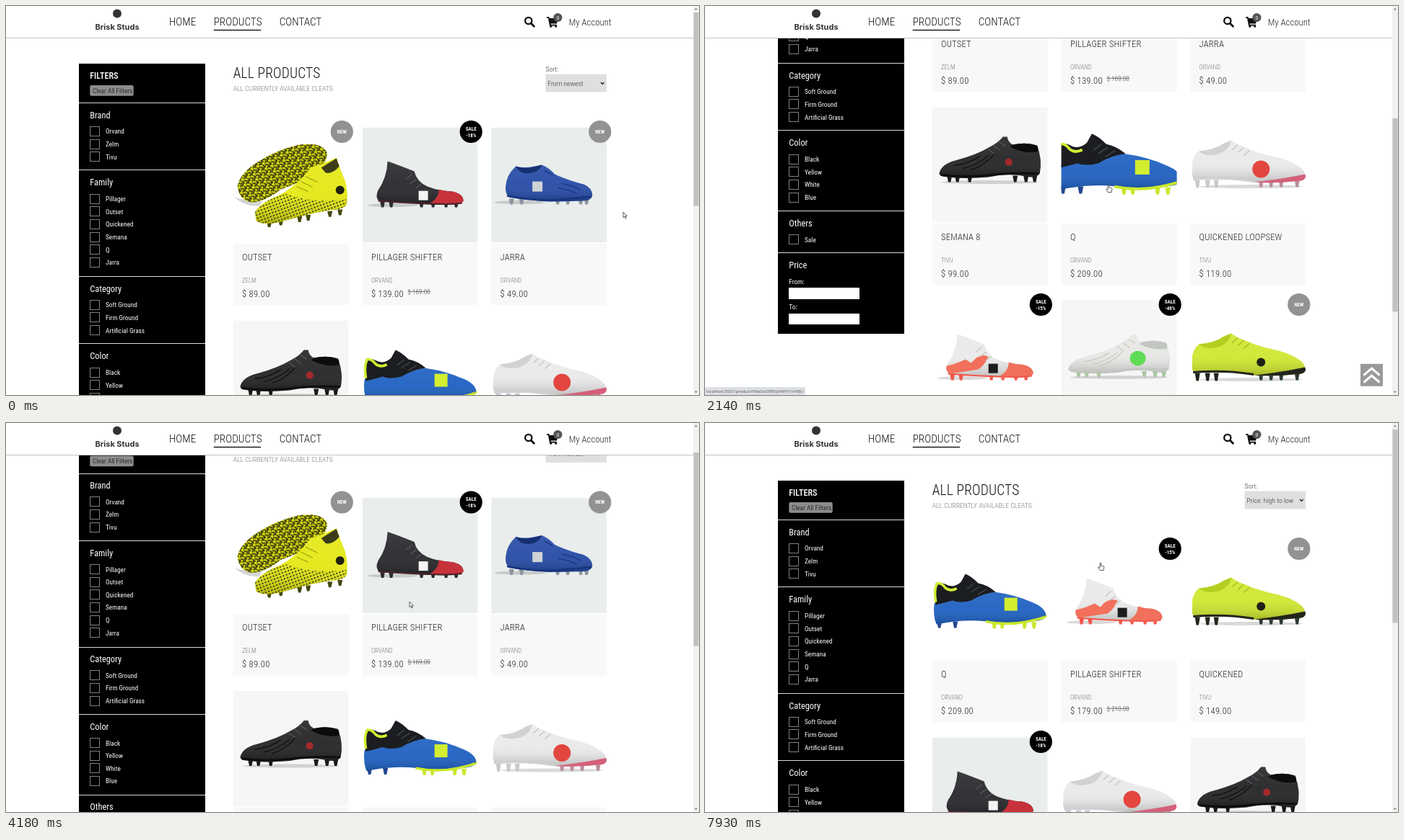
Animation of 960x540 px, one loop 8000 ms. Source, as an HTML page:

```html
<!DOCTYPE html>
<html lang="en">
<head>
<meta charset="utf-8">
<title>All products</title>
<style>
html, body { margin: 0; width: 100%; height: 100%; overflow: hidden; background: #fff; }
svg { display: block; width: 960px; height: 540px; }
text { font-family: 'Roboto Condensed', Roboto, sans-serif; font-stretch: 75%; white-space: pre; }
.status { font-family: 'Open Sans', sans-serif; font-stretch: 100%; }
.crisp { shape-rendering: crispEdges; }
</style>
</head>
<body>
<svg id="stage" viewBox="0 0 960 540">
  <defs>
    <clipPath id="frame"><rect width="160" height="160"/></clipPath>
    <linearGradient id="shade" x2="0" y2="1">
      <stop offset="0" stop-color="#fff" stop-opacity=".1"/>
      <stop offset=".55" stop-color="#fff" stop-opacity=".06"/>
      <stop offset="1" stop-color="#000" stop-opacity=".2"/>
    </linearGradient>
    <pattern id="dots" width="4.4" height="4.4" patternUnits="userSpaceOnUse" patternTransform="rotate(-20)">
      <circle cx="2.2" cy="2.2" r="1.2" fill="#33350e"/>
    </pattern>
    <pattern id="scratch" width="9" height="8" patternUnits="userSpaceOnUse" patternTransform="rotate(-25)">
      <path d="M0 1L5 4M4 8L8 2M1 7L4 5M6 0L9 5" stroke="#2e310c" stroke-width="1.7"/>
    </pattern>
  </defs>
  <g id="page"></g>
  <g id="head"></g>
  <g id="over"></g>
</svg>
<script>
const NS = 'http://www.w3.org/2000/svg', LOOP = 8000, ROW = 268;
const $ = id => document.getElementById(id);
const page = $('page'), head = $('head'), over = $('over');

function add(parent, tag, attrs, str) {
  const el = document.createElementNS(NS, tag);
  for (const k in attrs) el.setAttribute(k, attrs[k]);
  if (str !== undefined) el.textContent = str;
  parent.appendChild(el);
  return el;
}
const rect = (p, x, y, width, height, fill, more) => add(p, 'rect', { x, y, width, height, fill, ...more });
const path = (p, d, fill, more) => add(p, 'path', { d, fill, ...more });
const line = (p, d, stroke, w, more) => path(p, d, 'none', { stroke, 'stroke-width': w, ...more });
const disc = (p, cx, cy, r, fill) => add(p, 'circle', { cx, cy, r, fill });
const text = (p, x, y, size, fill, str, weight = 300, more = {}) =>
  add(p, 'text', { x, y, 'font-size': size, fill, 'font-weight': weight, ...more }, str);
const show = (el, on) => el.setAttribute('visibility', on ? 'visible' : 'hidden');
const crisp = { class: 'crisp' };

// ---- shoes, each in a 160 x 160 box ----
function studs(g, xs, y, fill, h = 6, slope = 0) {
  xs.forEach(x => path(g, `M${x - 3.5} ${y + slope * x - 3}h7l-1.8 ${h + 3}h-3.4z`, fill));
}
function body(g, d, fill) {
  path(g, d, fill);
  path(g, d, 'url(#shade)');
}
const shadow = (g, cx, cy, rx) => add(g, 'ellipse', { cx, cy, rx, ry: 2.5, fill: '#000', opacity: .15 });

function pair(g) {
  const sole = 'M6 82Q9 64 34 48Q60 31 92 24Q125 20 130 36Q131 51 108 66Q92 77 66 86Q48 101 28 104Q9 103 6 82Z';
  const upper = 'M30 118Q38 104 64 94Q86 82 101 64L107 56Q124 51 143 42Q148 58 155 74Q160 92 157 108Q150 115 132 115Q100 121 70 130Q44 137 32 130Z';
  path(g, 'M2 97Q22 104 42 100L36 109Q15 110 2 97Z', '#aaa', { opacity: .5 });
  path(g, sole, '#dadb12');
  path(g, sole, 'url(#scratch)');
  studs(g, [50, 66, 92, 104, 134, 148], 142, '#45470f', 5, -.17);
  body(g, upper, '#e4e812');
  path(g, 'M30 118Q44 99 75 92Q105 106 157 100L157 108Q150 115 132 115Q100 121 70 130Q44 137 32 130Z', 'url(#dots)');
  path(g, 'M122 56Q133 49 143 43L147 54Q138 65 128 63Z', '#3c3d18');
  line(g, 'M88 82l16 7M94 75l16 8M100 68l17 8', '#a8ad12', 1.5);
  disc(g, 148, 87, 6, '#20210f');
}

function boot(g, c) {
  shadow(g, 42, 108, 35);
  studs(g, [28, 40, 82, 98, 116, 130], 105, c.stud, 6);
  body(g, 'M35 47Q52 53 72 61Q75 75 90 82Q105 88 124 89Q140 92 140 102Q138 107 124 107Q85 108 62 104L24 103Q17 97 22 87Q34 70 35 47Z', c.main);
  path(g, 'M106 86Q115 89 124 89Q140 92 140 102Q138 107 124 107L92 106Q106 99 106 86Z', c.toe);
  if (c.flame) path(g, 'M20 91Q34 88 46 82L54 87Q66 72 78 78Q73 90 64 96L24 102Q18 97 20 91Z', c.flame);
  line(g, 'M22 102Q60 105 94 106T138 105', c.sole, 2);
  line(g, 'M69 65l-8 7M75 72l-9 6M82 78l-8 6', c.lace, 1.3);
  rect(g, 78, 88, 13, 13, c.mark);
}

function low(g) {
  shadow(g, 40, 104, 36);
  studs(g, [28, 42, 92, 106, 124, 132], 102, '#8d94a0', 5);
  body(g, 'M20 82Q21 66 34 54Q45 57 60 54L70 52Q80 56 88 65Q106 73 128 79Q141 85 140 95Q138 102 126 102L80 103Q50 101 25 97Q19 92 20 82Z', '#2349a5');
  path(g, 'M34 54Q45 58 60 55L70 52Q66 63 52 64Q38 64 34 54Z', '#162f70');
  line(g, 'M22 95Q62 103 96 100T139 96', '#17357f', 2.5);
  line(g, 'M74 60l11 6M98 78q14 2 26 9M92 84q15 2 27 8', '#16377f', 1.3);
  rect(g, 57, 75, 14, 14, '#cfd3d6');
}

function knit(g, c) {
  shadow(g, 80, 104, 68);
  studs(g, [24, 35, 52, 115, 130, 142], 98, c.stud, 6);
  body(g, 'M10 91Q13 79 32 74Q62 66 80 55Q92 49 98 41L104 41Q105 49 112 52Q130 48 145 53Q153 72 149 92Q144 99 130 96Q105 91 78 97Q40 100 14 96Q9 94 10 91Z', c.main);
  path(g, 'M112 52Q130 48 145 53Q148 57 146 62Q126 65 108 55Z', c.dark);
  line(g, 'M12 94Q50 98 80 94T148 92', c.dark, 2.5);
  line(g, 'M30 81q20-2 36-13M42 85q20-4 36-18M54 87q18-6 32-22', c.dark, 1.2);
  line(g, 'M77 58l9 7M85 53l9 7M93 48l9 6', c.lace, 1.3);
  disc(g, 106, 76, c.size, c.mark);
}

function speed(g) {
  studs(g, [10, 32], 110, '#23468f', 6);
  studs(g, [86, 97, 128, 141], 111, '#c9e82c', 6);
  body(g, 'M3 82Q12 74 28 78Q60 60 86 66Q116 70 140 81Q157 88 158 99Q156 106 136 107Q104 113 76 107Q44 103 6 111Q1 100 3 82Z', '#1b5ec0');
  path(g, 'M5 54Q14 52 22 57Q32 60 40 52L46 41Q54 44 64 54Q76 56 88 66Q70 68 54 78Q38 82 28 78L5 84Q2 68 5 54Z', '#1b1d20');
  line(g, 'M5 80Q2 62 7 54Q13 53 18 60Q25 66 34 61', '#d3ee2f', 3.5);
  line(g, 'M74 107Q104 113 132 107T157 99', '#c9e82c', 3.5);
  line(g, 'M58 54l-10 8M66 58l-12 8M75 62l-12 8', '#3d4146', 1.6);
  rect(g, 100, 74, 18, 18, '#d3ee2f');
}

function sprint(g, c) {
  shadow(g, 84, 110, 72);
  studs(g, [10, 24, 36], 104, c.stud, 8);
  studs(g, [98, 112, 126, 148], 104, c.stud2, 7);
  body(g, 'M3 86Q1 70 12 61Q32 60 47 50L57 46Q64 52 77 56Q94 64 118 69Q144 75 156 87Q163 96 154 102Q120 106 88 104Q46 97 6 101Q1 96 3 86Z', c.main);
  path(g, 'M12 61Q32 60 47 50L57 46Q54 60 39 65Q20 69 12 61Z', c.dark);
  path(g, 'M88 104Q126 100 159 93Q162 99 154 102Q120 106 88 104Z', c.sole);
  line(g, 'M4 100Q48 96 88 103', c.base, 3);
  line(g, 'M66 52l-8 7M74 56l-8 7M82 60l-8 7', c.lace, 1.3);
  disc(g, 98, 86, c.size, c.mark);
}

const mist = '#e9edeb', pale = '#f6f6f6';
const items = {
  pair: { name: 'OUTSET', brand: 'ZELM', price: 89, tag: 'NEW', draw: pair },
  red: { name: 'PILLAGER SHIFTER', brand: 'ORVAND', price: 139, old: 169, tag: '-18%', bg: mist,
    draw: g => boot(g, { main: '#26262a', toe: '#c8323a', stud: '#2b2b2f', sole: '#4a2428', lace: '#55555a', mark: '#f4f4f4' }) },
  blue: { name: 'JARRA', brand: 'ORVAND', price: 49, tag: 'NEW', bg: mist, draw: low },
  dark: { name: 'SEMANA 8', brand: 'TIVU', price: 99, bg: pale,
    draw: g => knit(g, { main: '#222224', dark: '#0c0c0d', stud: '#1a1a1b', lace: '#55565a', mark: '#a52a2c', size: 5 }) },
  speed: { name: 'Q', brand: 'ORVAND', price: 209, draw: speed },
  white: { name: 'QUICKENED LOOPSEW', brand: 'TIVU', price: 119,
    draw: g => sprint(g, { main: '#e9e9ea', dark: '#d2d2d5', sole: '#d5607a', base: '#d0d0d2', stud: '#c9c9cc', stud2: '#b98b9c', lace: '#c4c4c8', mark: '#e2463f', size: 12 }) },
  flame: { name: 'PILLAGER SHIFTER', brand: 'ORVAND', price: 179, old: 210, tag: '-15%',
    draw: g => boot(g, { main: '#e9e9e9', toe: '#f0705c', flame: '#f2705c', stud: '#f2574a', sole: '#f2574a', lace: '#c6c6c6', mark: '#1d1d1d' }) },
  mint: { name: 'SEMANA 8', brand: 'TIVU', price: 70, old: 130, tag: '-46%', bg: pale,
    draw: g => knit(add(g, 'g', { transform: 'translate(0 9) scale(1 .94)' }),
      { main: '#e6e7e4', dark: '#c3c7c1', stud: '#a9c79f', lace: '#c6c9c4', mark: '#5fdc55', size: 11 }) },
  lime: { name: 'QUICKENED', brand: 'TIVU', price: 149, tag: 'NEW',
    draw: g => sprint(g, { main: '#cfe62e', dark: '#b4cf20', sole: '#23251c', base: '#23251c', stud: '#23251c', stud2: '#2c3a36', lace: '#a5bd1c', mark: '#1f2118', size: 6 }) }
};

function card(parent, item, i) {
  const g = add(parent, 'g', { transform: `translate(${[314.7, 493.6, 672.2][i % 3]} ${168.6 + ROW * Math.floor(i / 3)})` });
  const clip = add(g, 'g', { 'clip-path': 'url(#frame)' });
  const zoom = add(clip, 'g', {});
  rect(zoom, 0, 0, 160, 160, item.bg || '#fff');
  item.draw(zoom);
  rect(g, 0, 161.4, 160, 85, '#f8f8f8');
  text(g, 12.3, 184, 12.6, '#222', item.name, 300, { 'letter-spacing': .2 });
  text(g, 12.3, 215.4, 8.8, '#777', item.brand);
  text(g, 12.3, 235.2, 12.6, '#222', `$ ${item.price}.00`, 300, { 'letter-spacing': .3 });
  if (item.old) {
    text(g, 63, 231, 9.2, '#444', `$ ${item.old}.00`);
    line(g, 'M63 227.7h31.5', '#555', .8);
  }
  if (item.tag) {
    const sale = item.tag !== 'NEW', mid = { 'text-anchor': 'middle' };
    disc(g, 150.6, 5.9, 15.6, sale ? '#000' : '#929292');
    if (sale) {
      text(g, 150.6, 4, 7, '#fff', 'SALE', 700, mid);
      text(g, 150.6, 13, 7, '#fff', item.tag, 700, mid);
    } else text(g, 150.6, 8.4, 7, '#fff', 'NEW', 700, mid);
  }
  return zoom;
}
function grid(keys) {
  const g = add(page, 'g', {}), zooms = keys.map((k, i) => card(g, items[k], i));
  return { g, zooms };
}

// ---- page ----
text(page, 314.7, 99.6, 19.4, '#111', 'ALL PRODUCTS', 300, { 'letter-spacing': .2 });
text(page, 314.7, 118, 9.7, '#777', 'ALL CURRENTLY AVAILABLE CLEATS');
text(page, 747.5, 90.6, 9.7, '#333', 'Sort:');
rect(page, 747.5, 94.6, 84.5, 24.8, '#dfdfdf');
const choice = text(page, 750.3, 110.6, 9.8, '#333', '');
line(page, 'M824 106l2.3 2.4l2.3-2.4', '#111', 1.3);

rect(page, 101, 79.6, 175, 671.2, '#000', crisp);
text(page, 116.3, 101, 12.2, '#fff', 'FILTERS', 500);
rect(page, 116.3, 110, 60.4, 14.8, '#8c8c8c', { rx: 2 });
text(page, 120, 120.8, 9.2, '#2b2b2b', 'Clear All Filters', 400);
[134, 227, 375, 468, 580, 638].forEach(y => rect(page, 101, y, 175, 1, '#d8d8d8', crisp));
function group(title, y, names) {
  text(page, 116.3, y + 4.3, 12.4, '#fff', title, 400);
  names.forEach((n, i) => {
    const cy = y + 22.6 + 17.65 * i;
    rect(page, 116.6, cy - 6.6, 13, 13, 'none', { stroke: '#a0a0a0', 'stroke-width': .8, ...crisp });
    text(page, 138, cy + 3.3, 9.3, '#fff', n, 400);
  });
}
group('Brand', 151.4, ['Orvand', 'Zelm', 'Tivu']);
group('Family', 245.1, ['Pillager', 'Outset', 'Quickened', 'Semana', 'Q', 'Jarra']);
group('Category', 392.3, ['Soft Ground', 'Firm Ground', 'Artificial Grass']);
group('Color', 486.1, ['Black', 'Yellow', 'White', 'Blue']);
group('Others', 597.6, ['Sale']);
group('Price', 656.1, []);
[['From:', 678.6], ['To:', 713.9]].forEach(([s, y]) => {
  text(page, 116.3, y + 3.4, 9.5, '#fff', s, 400);
  rect(page, 116.3, y + 8.8, 98, 15.4, '#fff', crisp);
});

const newest = grid(['pair', 'red', 'blue', 'dark', 'speed', 'white', 'flame', 'mint', 'lime']);
const costly = grid(['speed', 'flame', 'lime', 'red', 'white', 'dark']);

// ---- header ----
rect(head, 0, 0, 952, 44, '#fff');
rect(head, 0, 44, 952, 1, '#c4c4c4');
disc(head, 154, 10.5, 6, '#333');
text(head, 154, 32.5, 11, '#333', 'Brisk Studs', 700,
  { 'text-anchor': 'middle', style: 'font-family:Inter,sans-serif;font-stretch:100%' });
[['HOME', 226], ['PRODUCTS', 287.7], ['CONTACT', 378.7]].forEach(([s, x]) => text(head, x, 27.2, 15.2, '#111', s));
rect(head, 287.7, 32.8, 65.5, 1.4, '#111');
add(head, 'circle', { cx: 723.8, cy: 20.4, r: 4.6, fill: 'none', stroke: '#111', 'stroke-width': 2.3 });
line(head, 'M727.5 24.2l4 4', '#111', 2.8, { 'stroke-linecap': 'round' });
path(head, 'M749 15h3.4l.6 2H765l-2 7.4H754.6l.3 1.4h8v1.6H753L751 16.7h-2z', '#111');
disc(head, 754.8, 28.3, 1.5, '#111');
disc(head, 761.8, 28.3, 1.5, '#111');
disc(head, 764.4, 16, 6.1, '#555');
text(head, 764.4, 18.6, 7, '#fff', '0', 400, { 'text-anchor': 'middle' });
text(head, 779.8, 26.6, 12.8, '#222', 'My Account');

// ---- overlays ----
const topBtn = add(over, 'g', {});
rect(topBtn, 908, 496.8, 31, 31, '#999');
line(topBtn, 'M912.5 512.5l11-9.5l11 9.5M912.5 522.5l11-9.5l11 9.5', '#fff', 3);

rect(over, 952, 0, 8, 540, '#f1f1f1');
path(over, 'M953.8 5.2h4l-2-2.4z', '#777');
path(over, 'M953.8 534.8h4l-2 2.4z', '#777');
const thumb = rect(over, 952.5, 9, 7, 268.5, '#c1c1c1');

const menu = add(over, 'g', {});
rect(menu, 747.5, 119.4, 84.5, 52, '#e2e2e2', { stroke: '#777', 'stroke-width': .5 });
const pick = rect(menu, 747.8, 119.6, 84, 13, '#1e74d2');
const options = ['From newest', 'From oldest', 'Price: low to high', 'Price: high to low'];
const labels = options.map((s, i) => text(menu, 750.3, 129.3 + 13 * i, 9.8, '#333', s));

const status = add(over, 'g', {});
const bar = rect(status, 0, 529, 142, 11, '#dcdfe3');
const link = add(status, 'text', { x: 2, y: 536.7, 'font-size': 5.7, fill: '#555', class: 'status' }, '');

const outline = { stroke: '#333', 'stroke-width': .8, 'stroke-linejoin': 'round' };
const arrow = path(over, 'M0 0V7.6L1.8 6L3 8.8L4.2 8.3L3 5.6H5.3Z', '#fff', outline);
const hand = path(over, 'M-.9 .7Q0-.4 .8 .7V4L4 4.7Q5 5 4.8 6.5L4 10.5H-.8L-3.4 6.4Q-3 5.2-1.9 6L-.9 6.8Z', '#fff', outline);

// ---- time ----
function track(keys, t) {
  if (t <= keys[0][0]) return keys[0].slice(1);
  for (let i = 1; i < keys.length; i++) {
    const a = keys[i - 1], b = keys[i];
    if (t < b[0]) return a.slice(1).map((v, j) => v + (b[j + 1] - v) * (t - a[0]) / (b[0] - a[0]));
  }
  return keys[keys.length - 1].slice(1);
}
const latest = (keys, t) => keys.reduce((v, k) => t >= k[0] ? k[1] : v, keys[0][1]);

const scrollKeys = [[1300, 0], [1460, 67.5], [1570, 110], [1750, 200], [1960, 250], [2140, 296], [2250, 296], [2310, 350],
  [3350, 350], [3370, 349], [3460, 295], [3550, 205], [3650, 125], [3740, 100], [4060, 100], [4400, 0]];
const moveKeys = [[110, 855, 286], [300, 770, 292], [480, 660, 272], [700, 575, 252], [890, 559, 248],
  [4420, 559, 248], [4600, 680, 200], [4810, 754, 123], [4890, 754, 123], [5180, 790, 107], [5380, 790, 107],
  [5760, 768, 158], [6000, 768, 158], [6050, 766, 161], [6250, 766, 161], [6540, 727, 165],
  [7630, 727, 165], [7780, 630, 140], [7930, 548, 194]];
const urls = ['', 'STDzC78VAbmbcO1gwqmd', 'VNaGsORff5qhWFH1nH8U', 'qHgsV1zmzJ58MmC0bIG4'];
const linkKeys = [[0, 0], [960, 1], [1750, 2], [3000, 0], [4350, 1], [4650, 3], [5100, 0]];
const hovers = [[2, 160, 450], [1, 520, 1700], [4, 1740, 2590], [1, 4300, 4570], [2, 4590, 4640]];
const handKeys = [[0, 0], [160, 1], [450, 0], [520, 1], [2590, 0], [4300, 1], [4690, 0], [7860, 1]];
const ZOOM = 300;
const ease = u => u * u * (3 - 2 * u);
const unit = v => Math.max(0, Math.min(1, v));

function zoomAt(i, t) {
  let z = 0;
  for (const [k, a, b] of hovers)
    if (k === i && t >= a) z = t < b ? unit((t - a) / ZOOM) : unit(Math.min(1, (b - a) / ZOOM) - (t - b) / ZOOM);
  return 1 + .11 * ease(z);
}

let lastUrl = -1;
function render(t) {
  const s = Math.round(track(scrollKeys, t)[0] * 2) / 2, [x, y] = track(moveKeys, t);
  page.setAttribute('transform', `translate(0 ${-s})`);
  thumb.setAttribute('y', 9 + .496 * s);
  show(topBtn, s > 90);

  const sorted = t >= 6750;
  show(newest.g, !sorted);
  show(costly.g, sorted);
  newest.zooms.forEach((z, i) => z.setAttribute('transform', `translate(80 80) scale(${zoomAt(i, t)}) translate(-80 -80)`));

  choice.textContent = t < 6250 ? options[0] : options[3];
  show(menu, t >= 5380 && t < 6250);
  const row = Math.max(0, Math.min(3, Math.floor((y - 119.4) / 13)));
  pick.setAttribute('y', 119.6 + 13 * row);
  labels.forEach((l, i) => l.setAttribute('fill', i === row ? '#fff' : '#333'));

  const u = latest(linkKeys, t);
  show(status, u > 0);
  if (u !== lastUrl) {
    link.textContent = 'localhost:3001/product/' + urls[u];
    bar.setAttribute('width', link.getComputedTextLength() + 5);
    lastUrl = u;
  }

  const onLink = latest(handKeys, t);
  show(arrow, !onLink);
  show(hand, onLink);
  for (const c of [arrow, hand]) c.setAttribute('transform', `translate(${x} ${y})`);
}

const start = performance.now();
function tick() {
  render((performance.now() - start) % LOOP);
  requestAnimationFrame(tick);
}
render(0);
tick();
</script>
</body>
</html>
```
